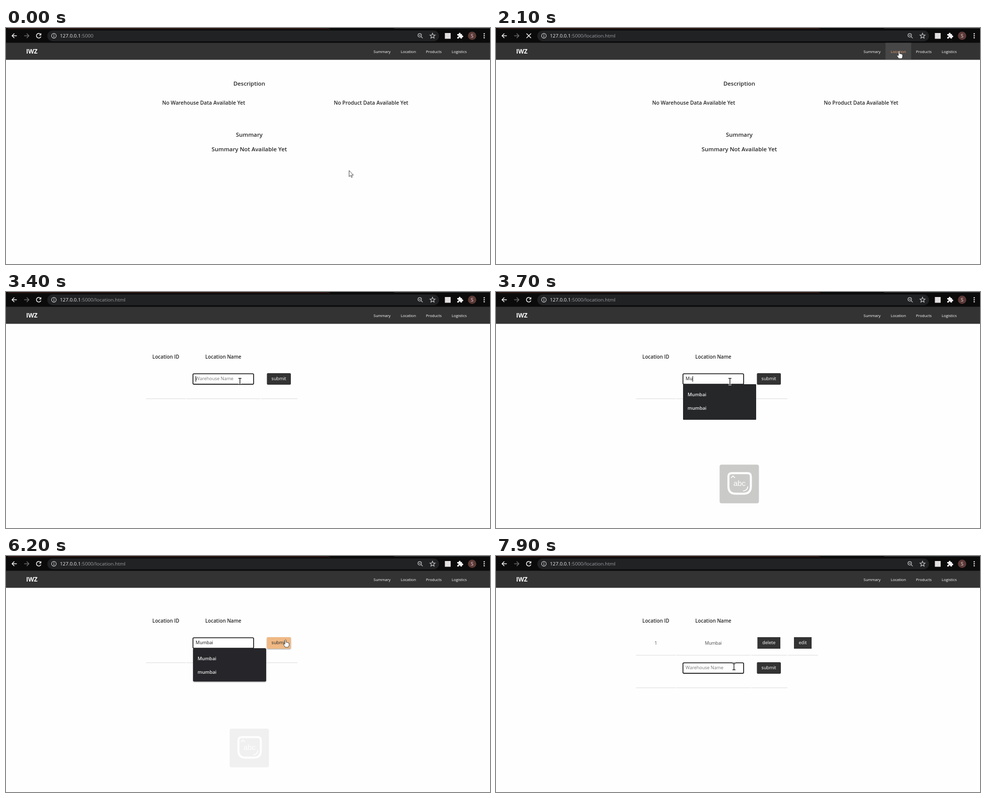
An HTML page that plays this animation: 960x471 px, repeating every 8000 ms.

```html
<!DOCTYPE html>
<html lang="en">
<head>
<meta charset="utf-8">
<title>Inventory</title>
<style>
html, body { margin: 0; width: 100%; height: 100%; overflow: hidden; background: #fefefe; }
svg { display: block; width: 960px; height: 471px; }
text { font-family: "Open Sans", "Noto Sans", sans-serif; white-space: pre; }
.head { font-weight: 600; fill: #262626; text-anchor: middle; }
.nav { font-size: 7.55px; fill: #fff; }
.form { font-family: "Liberation Sans", Arial, sans-serif; font-size: 9px; }
.line { fill: none; stroke-width: 1.5; }
.rule { stroke: #dcdcdc; stroke-width: 1.2; }
</style>
</head>
<body>
<svg viewBox="0 0 960 471">
  <defs>
    <filter id="soft" x="-20%" y="-20%" width="140%" height="150%">
      <feDropShadow dx="0" dy="1" stdDeviation="1.2" flood-opacity=".4"/>
    </filter>
  </defs>
  <rect width="960" height="471" fill="#fefefe"/>

  <g id="browser">
    <rect width="960" height="30" fill="#0b0b0b"/>
    <path d="M4 1.2H636Q640 1.2 642 2.5" class="line" stroke="#54261f" style="stroke-width:1"/>
    <path d="M770 .5H960" class="line" stroke="#3c3d40" style="stroke-width:1"/>
    <rect x="82" y="5" width="777" height="21.5" rx="10.7" fill="#212224"/>
    <path d="M21.5 15.5H12.5M16.5 11 12 15.5 16.5 20" class="line" stroke="#f2f2f2"/>
    <path d="M36 15.5H45M41 11 45.5 15.5 41 20" class="line" stroke="#6a6a6a"/>
    <g id="reload">
      <path d="M68.4 12.3A4.6 4.6 0 1 0 69.3 17" class="line" stroke="#f2f2f2"/>
      <path d="M70 10V14.8H65.2Z" fill="#f2f2f2"/>
    </g>
    <path id="stop" d="M60.5 11 69.5 20M69.5 11 60.5 20" class="line" stroke="#f2f2f2"/>
    <circle cx="95" cy="15.5" r="4.6" class="line" stroke="#d8d8d8" style="stroke-width:1.1"/>
    <path d="M95 14.7V18M95 12.6V13.8" class="line" stroke="#d8d8d8" style="stroke-width:1.2"/>
    <text x="107" y="19.2" font-size="9.8" fill="#f0f0f0">127.0.0.1<tspan id="path" fill="#9b9da0"></tspan></text>
    <g class="line" stroke="#c4c4c4" style="stroke-width:1.2">
      <circle cx="820.6" cy="14.6" r="3.5"/>
      <path d="M823.2 17.2 826.6 20.4M818.8 14.6H822.4"/>
      <path d="M846 10.4 847.4 13.9 851.1 14.2 848.3 16.6 849.2 20.2 846 18.2 842.8 20.2 843.7 16.6 840.9 14.2 844.6 13.9Z"/>
    </g>
    <rect x="870.5" y="10" width="11.5" height="11.5" fill="#e3dfdf"/>
    <path d="M895 12H898.2A1.8 1.8 0 1 1 901.6 12H904.4V15A1.8 1.8 0 1 1 904.4 18.3V21H901.4A1.7 1.7 0 1 0 898.2 21H895V18A1.7 1.7 0 1 0 895 15Z" fill="#f4f4f4"/>
    <circle cx="924.5" cy="15.5" r="8.3" fill="#5d3a37"/>
    <text x="924.5" y="19" font-size="9" fill="#eee" text-anchor="middle">S</text>
    <g fill="#eee"><circle cx="948.5" cy="11.5" r="1.3"/><circle cx="948.5" cy="15.5" r="1.3"/><circle cx="948.5" cy="19.5" r="1.3"/></g>
  </g>

  <rect y="29.5" width="960" height="34" fill="#333"/>
  <rect id="navHover" x="772.5" y="29.5" width="51" height="33.5" fill="#474747"/>
  <text x="40" y="51.2" font-size="12" font-weight="700" fill="#fff">IWZ</text>
  <g class="nav">
    <text x="729" y="49.7">Summary</text>
    <text x="783" y="49.7" id="navLocation">Location</text>
    <text x="833" y="49.7">Products</text>
    <text x="884" y="49.7">Logistics</text>
  </g>

  <g id="home" class="head">
    <text x="482.5" y="115" font-size="11.4">Description</text>
    <text x="392" y="153" font-size="10.25">No Warehouse Data Available Yet</text>
    <text x="724" y="153" font-size="10.25">No Product Data Available Yet</text>
    <text x="482.5" y="217" font-size="11.4">Summary</text>
    <text x="482.5" y="246" font-size="11.4">Summary Not Available Yet</text>
  </g>

  <g id="location">
    <g class="head" font-size="9.8">
      <text x="317" y="133">Location ID</text>
      <text x="431" y="133">Location Name</text>
    </g>
    <g id="row">
      <g font-size="8.6" fill="#444" text-anchor="middle">
        <text x="317" y="176.8">1</text>
        <text x="431" y="176.8">Mumbai</text>
      </g>
      <path d="M518.5 162H564V185H518.5ZM591 162H626V185H591Z" fill="#333"/>
      <g class="form" fill="#fff" text-anchor="middle">
        <text x="541.2" y="176.4">delete</text>
        <text x="608.5" y="176.4">edit</text>
      </g>
      <path class="rule" d="M277.5 198H357M358 198H504.5M506 198H577.5M579 198H638.5"/>
    </g>
    <g id="form" class="form">
      <path class="rule" d="M277.5 213H357M358 213H504.5M506 213H578"/>
      <rect id="field" x="370.8" y="163.3" width="120.4" height="20.8" rx="2" fill="#fff"/>
      <text id="value" x="376" y="176.4"></text>
      <rect id="caret" y="168" width="1" height="11" fill="#000"/>
      <rect id="submit" x="517.5" y="162" width="47.5" height="23" rx="2"/>
      <text id="submitLabel" x="541.2" y="176.4" text-anchor="middle">submit</text>
    </g>
    <g id="menu">
      <rect id="menuBox" x="371" y="184" width="145" fill="#262729"/>
      <g font-size="9.3" font-weight="600" fill="#ececec">
        <text x="380" y="207.7">Mumbai</text>
        <text x="380" y="234.9">mumbai</text>
      </g>
    </g>
  </g>

  <g id="keyHint">
    <rect x="443.5" y="344.5" width="78" height="77.3" rx="4" fill="#c8c9c6"/>
    <path d="M468 361.5H499Q505.5 361.5 505.5 368V388Q505.5 402.5 491 402.5H475Q461 402.5 461 388V368Q461 361.5 468 361.5Z" fill="none" stroke="#fff" stroke-width="4"/>
    <path d="M466 371 470 367.2 474 371M499.5 388Q499 396.5 490 397" fill="none" stroke="#fff" stroke-width="1.7"/>
    <text class="form" x="483" y="387.3" text-anchor="middle" style="font-size:15px" fill="#fff">abc</text>
  </g>

  <g id="pointer">
    <path id="arrow" d="M0 0V12.2L2.8 9.7 4.7 13.8 6.5 13 4.7 9.1H8.6Z" fill="#fff" stroke="#222" stroke-width=".8"/>
    <path id="hand" d="M-1.3 1Q0-1 1.2 1V5.4Q2.4 4.6 3.4 5.8 4.6 5 5.4 6.4 7 6 7 8V11Q6.8 13 5.4 15H-.8Q-2.5 12-4.3 9.8-4.6 7.6-1.3 9Z" fill="#fff" stroke="#222" stroke-width=".8" stroke-linejoin="round"/>
    <g id="beam" fill="none">
      <path d="M-3-6.2H3M0-6.2V6.2M-3 6.2H3" stroke="#fff" stroke-width="3"/>
      <path d="M-3-6.2H3M0-6.2V6.2M-3 6.2H3" stroke="#111" stroke-width="1.3"/>
    </g>
  </g>
</svg>
<script>
const LOOP = 8000, STEP = 100;
const CLICK_NAV = 2000, LOAD_LOCATION = 2300, TYPE_START = 3500, TYPE_STEP = 200;
const CLICK_SUBMIT = 6500, SUBMIT_LOADING = 6900, LOAD_ROW = 7000;
const WORD = "Mumbai";

// time, x, y of the pointer's hot spot
const pointerPath = [
  [100, 680.5, 284.5], [1500, 799.5, 46], [2200, 799.5, 46], [2800, 464, 178.5],
  [4800, 464, 178.5], [5300, 428, 164], [6200, 554.5, 167],
  [7000, 554.5, 167], [7600, 472, 221]
];
// time, opacity
const hintFade = [[3500, 1], [3700, 0.945], [5300, 0.685], [6700, 0]];

const $ = id => document.getElementById(id);
const set = (id, attrs) => { for (const k in attrs) $(id).setAttribute(k, attrs[k]); };
const show = (id, on) => set(id, { display: on ? "inline" : "none" });
const inside = ([x, y], left, top, right, bottom) => x >= left && x <= right && y >= top && y <= bottom;
const smooth = u => u * u * (3 - 2 * u);

function along(keys, t, ease = u => u) {
  if (t <= keys[0][0]) return keys[0].slice(1);
  const next = keys.findIndex(key => key[0] > t);
  if (next < 0) return keys[keys.length - 1].slice(1);
  const [t0, ...from] = keys[next - 1], [t1, ...to] = keys[next];
  const u = ease((t - t0) / (t1 - t0));
  return from.map((v, i) => v + (to[i] - v) * u);
}

function drawForm(t, spot, hasRow) {
  const offset = hasRow ? 50 : 0;
  const count = hasRow ? 0 : Math.max(0, Math.min(WORD.length, Math.floor((t - TYPE_START) / TYPE_STEP) + 1));
  const typed = WORD.slice(0, count);
  const focused = t < CLICK_SUBMIT || hasRow;
  const onField = inside(spot, 370, 157 + offset, 492, 185 + offset);
  const onButton = inside(spot, 517, 162 + offset, 565, 185 + offset);

  set("form", { transform: `translate(0 ${offset})` });
  set("field", { stroke: focused ? "#111" : "#dadada", "stroke-width": focused ? 1.6 : 1 });
  const value = $("value");
  value.textContent = typed || "Warehouse Name";
  set("value", { fill: typed ? "#111" : "#757575" });

  const typeEnd = TYPE_START + (WORD.length - 1) * TYPE_STEP;
  const typing = t >= TYPE_START && t <= typeEnd;
  const blinkStart = hasRow ? LOAD_ROW : t > typeEnd ? typeEnd : LOAD_LOCATION;
  show("caret", focused && (typing || (t - blinkStart) % 1000 < 500));
  set("caret", { x: 376 + (typed ? value.getComputedTextLength() : 0) });

  set("submit", { fill: onButton ? "#efb884" : "#333", filter: onButton ? "url(#soft)" : "none" });
  set("submitLabel", { fill: onButton ? "#222" : "#fff" });

  show("menu", t >= TYPE_START && t < CLICK_SUBMIT);
  const settled = count > 2 || count < 2;
  set("menuBox", {
    height: count < 2 ? 94 : count === 2 ? 71 : 66.5,
    rx: settled ? 2.5 : 1,
    filter: settled ? "url(#soft)" : "none"
  });
  return onField ? "beam" : onButton ? "hand" : "arrow";
}

function draw(t) {
  const spot = along(pointerPath, t, smooth);
  const onLocation = t >= LOAD_LOCATION;
  const hasRow = t >= LOAD_ROW;
  const navHover = inside(spot, 772.5, 30, 823.5, 63);
  const loading = (t >= CLICK_NAV && !onLocation) || (t >= SUBMIT_LOADING && !hasRow);

  show("reload", !loading);
  show("stop", loading);
  $("path").textContent = ":5000" + (t >= CLICK_NAV ? "/location.html" : "");
  show("navHover", navHover);
  set("navLocation", { fill: navHover ? "#f0a273" : "#fff" });
  show("home", !onLocation);
  show("location", onLocation);
  show("row", hasRow);

  let shape = onLocation ? drawForm(t, spot, hasRow) : "arrow";
  if (navHover) shape = "hand";
  for (const id of ["arrow", "hand", "beam"]) show(id, id === shape);
  set("pointer", { transform: `translate(${spot[0]} ${spot[1]})` });

  set("keyHint", { opacity: t < TYPE_START ? 0 : along(hintFade, t)[0] });
}

const start = performance.now();
function tick() {
  const t = (performance.now() - start) % LOOP;
  draw(Math.floor(t / STEP) * STEP);
  requestAnimationFrame(tick);
}
tick();
</script>
</body>
</html>
```
